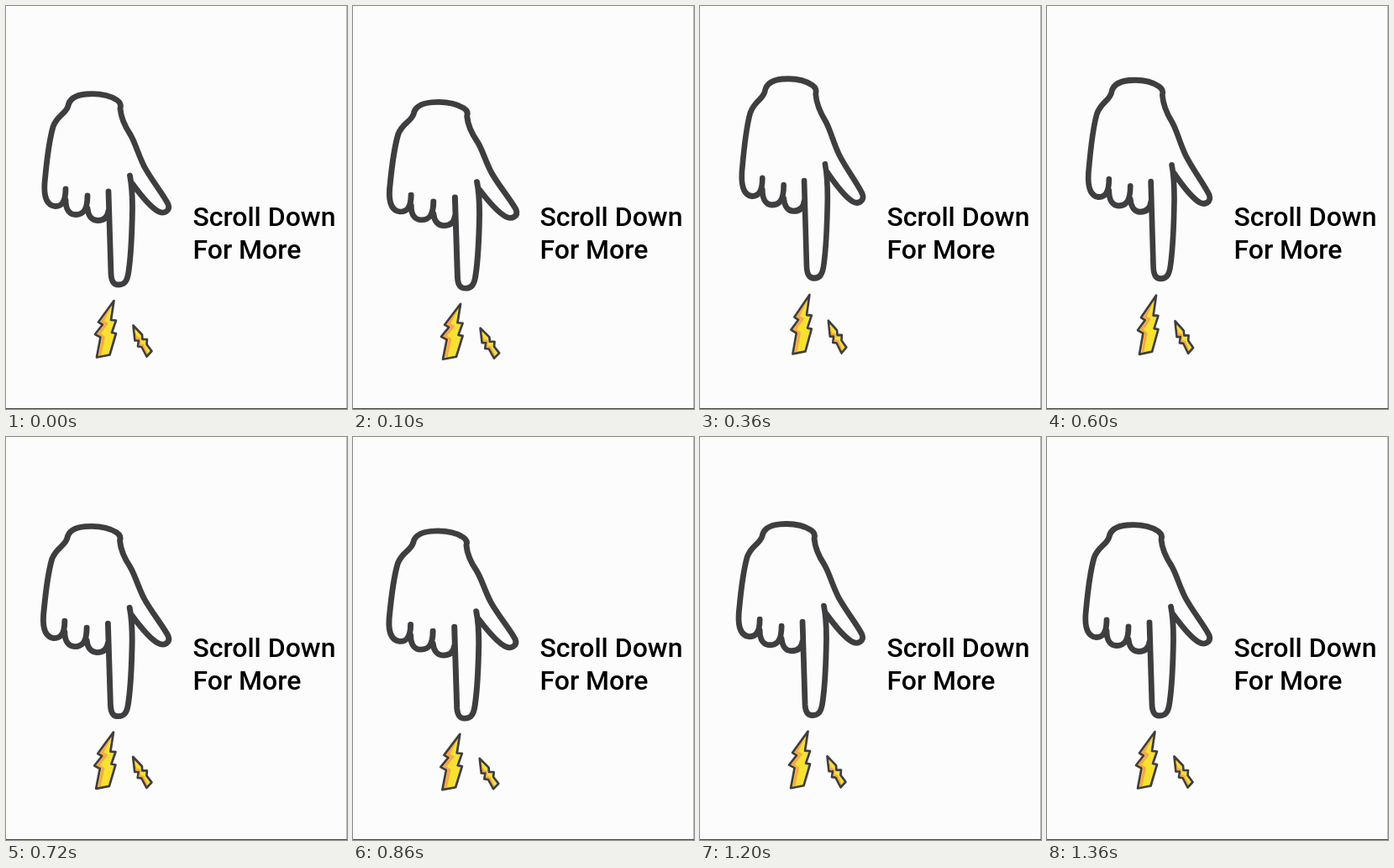
An HTML page for the animation above (1.6 s loop, 406 by 480 pixels).

```html
<!DOCTYPE html>
<html lang="en">
<head>
<meta charset="utf-8">
<title>Scroll Down For More</title>
<style>
  html, body { margin: 0; width: 100%; height: 100%; overflow: hidden; background: #fcfcfc; }
  svg { display: block; }
  text { font: 500 32px Roboto, sans-serif; }
  #art { stroke: #3e3e40; stroke-linecap: round; stroke-linejoin: round; }
  .hand { fill: none; stroke-width: 6.8; }
  .bolt { fill: #f9e130; stroke-width: 2.7; }
  .shade { fill: #f3a558; stroke: none; }
</style>
</head>
<body>
<svg width="406" height="480" viewBox="0 0 406 480">
  <path d="M405.5 0V480" stroke="#b4b4b4"/>
  <path d="M0 479.5H406" stroke="#444"/>
  <g id="art">
    <path class="hand" d="M122 221L125 319C125.500 328 128 332 134 332C141 332 144.500 328 146 316
      C149.500 292 150 270 150.500 241C150.500 226 150 214 147.500 202
      M150 211C158 222 171 239 181 244.500C188 248.500 196 244 193 236C187 224 173 207 164.500 191
      C157 176 154 163 148 153C142 144 137 134 136 122Q138 116 132 112
      C122 105.500 107 104 95 105C80 106.500 75 113 74 119C71 129 61 130 56 144
      C50 165 48 190 46 211C45 226 48 237 58 238.500C67 239 71 232 71 218
      M71 231C71 243 76 248.500 83 248.500C92 248.500 97 243 97 226
      M97 241C98 251 103 255.500 109 255.500C116 255.500 121 252 122 244"/>
    <path class="bolt" d="M128.500 351L110 376.500L115 379.500L106 391L112.500 394.500L108 418.500L123.500 415.500L131 390L126 389L131 374.500L125 374Z"/>
    <path class="shade" d="M126 357L112.500 376L117.500 379L108.500 390.500L114.500 394L110.500 416.500L113.500 415.500L118 394L113 390L122 378L117 375Z"/>
    <path class="bolt" d="M151.500 380.500L153.500 398.500L158 398.500L157 405.500L161.500 406L167.500 417.500L173.500 411L167.500 403L168 397L162.500 397L162 391.500Z"/>
    <path class="shade" d="M153 385L155 397L159.500 397L158.500 404L162.500 404.500L167.500 414.500L168.500 413L164 403L160 402L161 396L156 394Z"/>
  </g>
  <text x="222.400" y="262">Scroll Down</text>
  <text x="222.400" y="300.500">For More</text>
</svg>
<script>
const art = document.getElementById("art");
const LOOP = 1600, PIVOT_X = 147, PIVOT_Y = 510;

const inOut = p => p < 0.5 ? 2 * p * p : 1 - 2 * (1 - p) ** 2;
const out = p => 1 - (1 - p) ** 3;

// time, horizontal scale, vertical scale, sideways shift, easing into this pose
const poses = [
  [0, 1, 1, 0, inOut],
  [220, 1.0575, 0.9432, 0, inOut],
  [480, 0.967, 1.055, 1.6, out],
  [500, 0.967, 1.055, 1.6, inOut],
  [820, 1.021, 0.982, -0.8, inOut],
  [860, 1.021, 0.982, -0.8, inOut],
  [1060, 1, 1, 0, inOut],
  [1220, 0.998, 1.003, 0, inOut],
  [1360, 1, 1, 0, inOut],
  [LOOP, 1, 1, 0, inOut]
];

function draw() {
  const t = performance.now() % LOOP;
  const i = poses.findIndex(pose => pose[0] > t);
  const from = poses[i - 1], to = poses[i];
  const p = to[4]((t - from[0]) / (to[0] - from[0]));
  const [sx, sy, shift] = [1, 2, 3].map(k => from[k] + (to[k] - from[k]) * p);
  art.setAttribute("transform",
    `translate(${PIVOT_X + shift} ${PIVOT_Y}) scale(${sx} ${sy}) translate(${-PIVOT_X} ${-PIVOT_Y})`);
  requestAnimationFrame(draw);
}
draw();
</script>
</body>
</html>
```
